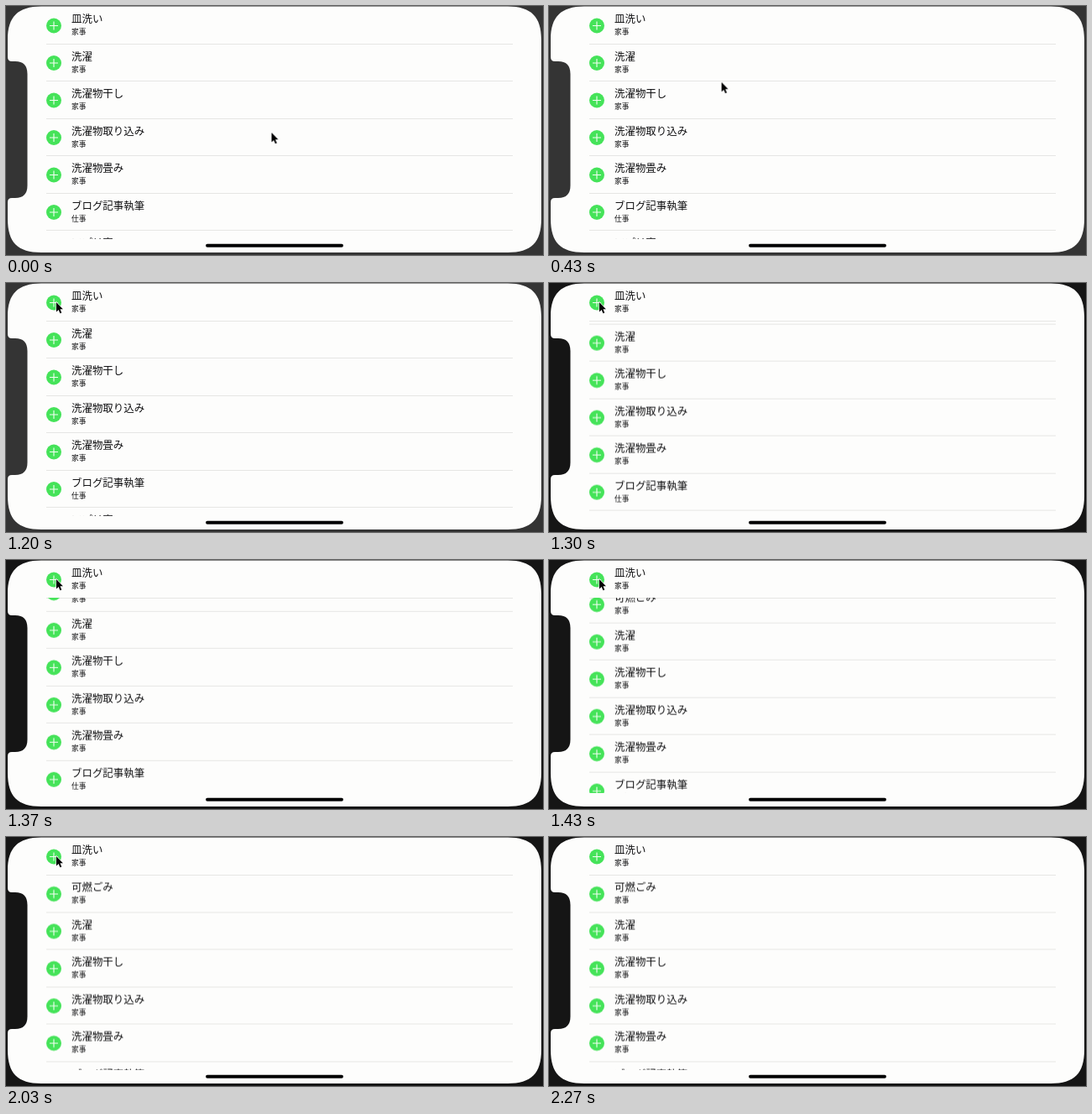
Recreate the animation shown at these times as an HTML page. Size 640 px wide and 297 px high, loop 3.16 s.

```html
<!DOCTYPE html>
<html lang="ja">
<head>
<meta charset="utf-8">
<title>Task list</title>
<style>
  html, body { margin: 0; width: 100%; height: 100%; overflow: hidden; background: #151515; }
  svg { display: block; width: 100vw; height: 100vh; }
  text { font-family: "Noto Sans CJK JP", "Noto Sans CJK", sans-serif; fill: #101012; }
  .title { font-size: 12.45px; }
  .kind { font-size: 8.75px; }
  .line { stroke: #e6e6e4; stroke-width: 1; shape-rendering: crispEdges; }
  .dot { fill: #45e359; }
  .plus { stroke: #f4fff4; stroke-width: 1.1; fill: none; }
  .bezel, .list, .cursor { animation: 3160ms linear infinite; }
  .bezel { animation-name: bezel; }
  .list { animation-name: insert; }
  .cursor { animation-name: point; }

  @keyframes bezel {
    0%, 39.1% { fill: #343434; }
    39.11%, 100% { fill: #151515; }
  }
  @keyframes insert {
    0% { transform: translateY(0); }
    39.114% { transform: translateY(0); animation-timing-function: ease-in-out; }
    49.43%, 100% { transform: translateY(44.5px); }
  }
  @keyframes point {
    0% { transform: translate(316.5px, 151px); animation-timing-function: cubic-bezier(.5, 0, .7, .6); }
    13.608% { transform: translate(206px, 91px); animation-timing-function: cubic-bezier(.3, .28, .6, .95); }
    23.101% { transform: translate(77px, 31px); animation-timing-function: ease-out; }
    33.861% { transform: translate(60px, 23px); }
    64.241% { transform: translate(60px, 23px); animation-timing-function: ease-in; }
    71.835%, 100% { transform: translate(11px, -18px); }
  }
</style>
</head>
<body>
<svg viewBox="0 0 640 297" preserveAspectRatio="none">
  <defs>
    <clipPath id="view"><rect y="45" width="640" height="233"/></clipPath>
  </defs>
  <rect class="bezel" width="640" height="297"/>
  <path fill="#fdfdfc" d="M42 0.5H598C626 0.5 638 13 638 40V254C638 282 626 294 598 294H42C14 294 2 282 2 254V234
    Q2 229 7 229H11Q25.5 229 25.5 214V81Q25.5 66 11 66H7Q2 66 2 61V40C2 13 14 0.5 42 0.5Z"/>
  <g id="first"></g>
  <g clip-path="url(#view)"><g class="list" id="list"></g></g>
  <rect x="238" y="283.8" width="164" height="4" rx="2" fill="#040404"/>
  <path class="cursor" d="M0 0V11.4L2.6 9L4.5 13.3L6.3 12.5L4.5 8.3H7.9Z"
    fill="#000" stroke="#fff" stroke-width="1.2" paint-order="stroke"/>
</svg>
<script>
  const PITCH = 44.5;
  const row = (title, kind, slot) => `
    <g transform="translate(0 ${slot * PITCH})">
      <circle class="dot" cx="57" cy="23.5" r="9"/>
      <path class="plus" d="M52 23.5h10M57 18.5v10"/>
      <text class="title" x="78" y="20.1">${title}</text>
      <text class="kind" x="78" y="34.1">${kind}</text>
      <path class="line" d="M48 45.3H604"/>
    </g>`;

  const tasks = ['可燃ごみ', '洗濯', '洗濯物干し', '洗濯物取り込み', '洗濯物畳み', 'ブログ記事執筆', 'アプリ案'];
  const kindOf = (i) => (i < 5 ? '家事' : '仕事');

  document.getElementById('first').innerHTML = row('皿洗い', '家事', 0);
  document.getElementById('list').innerHTML = tasks.map((t, i) => row(t, kindOf(i), i)).join('');
</script>
</body>
</html>
```
